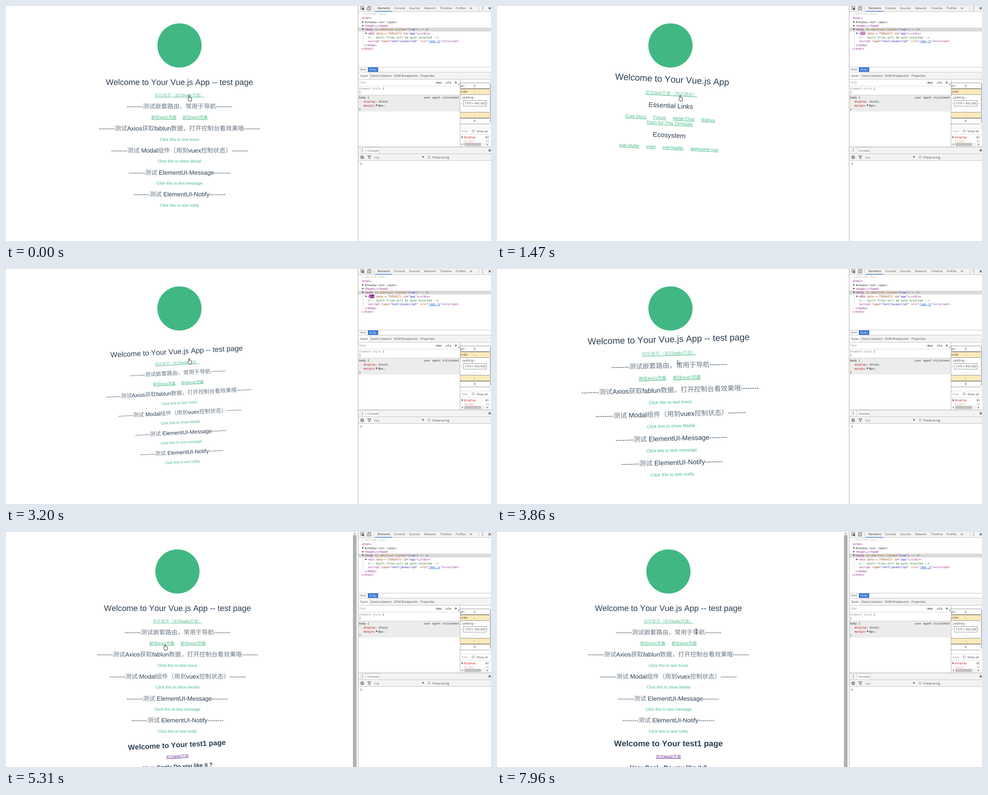
Write an HTML page that moves like this. It is 1075 by 521 pixels and loops after 8000 ms.

```html
<!DOCTYPE html>
<html lang="en">
<head>
<meta charset="utf-8">
<title>Route transitions</title>
<style>
html, body { margin: 0; width: 100%; height: 100%; overflow: hidden; background: #fff; }
svg { display: block; width: 1075px; height: 521px; }
text { white-space: pre; text-rendering: geometricPrecision; font-kerning: none; }
.page text { font-family: "Liberation Sans", Arial, "Noto Sans CJK SC", "Noto Sans CJK", sans-serif; text-anchor: middle; fill: #2c3e50; }
.page .link { fill: #42b983; }
.page .visited { fill: #551a8b; }
.page .u { text-decoration: underline; }
.cjk { fill-opacity: .7; }
.ui { font: 6.5px "Open Sans", "Noto Sans", sans-serif; fill: #444; }
.mono { font: 6.21px "DejaVu Sans Mono", "Noto Sans Mono", monospace; fill: #222; }
.bold { font-weight: bold; }
</style>
</head>
<body>
<svg id="stage" viewBox="0 0 1075 521"></svg>
<script>
const LOOP = 8000, SWAP_A = 650, SWAP_B = 2930, NEST = 5310;
const CX = 384.5, SHIFT = -4.5;
const stage = document.getElementById('stage');

function el(tag, attrs, parent = stage, text) {
  const node = document.createElementNS('http://www.w3.org/2000/svg', tag);
  for (const k in attrs) node.setAttribute(k, attrs[k]);
  if (text !== undefined) node.textContent = text;
  parent.appendChild(node);
  return node;
}
const group = parent => el('g', {}, parent);
const show = (node, on) => node.setAttribute('display', on ? 'inline' : 'none');

// ---- left page ----
const page = el('g', { class: 'page' });
el('circle', { cx: CX, cy: 87.5, r: 49, fill: '#41b883' }, page);

// Writes text, giving Chinese runs a lighter stroke.
function runs(node, str) {
  for (const part of str.match(/[\u3000-\uffff]+|[^\u3000-\uffff]+/g))
    el('tspan', /[\u3000-\uffff]/.test(part) ? { class: 'cjk' } : {}, node, part);
}
function line(parent, mid, size, str, cls = '') {
  runs(el('text', { x: CX, y: mid + size * .355, 'font-size': size, class: cls }, parent), str);
}
const h1 = (p, y, s, cls) => line(p, y, 18, s, cls);
const h2 = (p, y, s, cls) => line(p, y, 13.5, s, cls);
const link = (p, y, s, cls = 'link u') => line(p, y, 9, s, cls);
function links(parent, mid, list) {
  const row = el('text', { x: CX, y: mid + 3.2, 'font-size': 9, class: 'link' }, parent);
  list.forEach((s, i) => el('tspan', i ? { class: 'u', dx: 13.8 } : { class: 'u' }, row, s));
}
const rule = '-'.repeat(8);
const ruled = s => rule + s + rule;

const test = group(page);
h1(test, 169, 'Welcome to Your Vue.js App -- test page');
link(test, 197.5, '前往首页（返回hello页面）');
h2(test, 222, ruled('测试嵌套路由，常用于导航'));
links(test, 247, ['前往test1页面', '前往test2页面']);
h2(test, 271.5, ruled('测试Axios获取fablun数据，打开控制台看效果哦'));
link(test, 296, 'Click this to test Axios', 'link');
h2(test, 320, ruled('测试 Modal组件（用到vuex控制状态）'));
link(test, 344, 'Click this to show Modal', 'link');
h2(test, 369, ruled('测试 ElementUI-Message'));
link(test, 393, 'Click this to test message', 'link');
h2(test, 417.7, ruled('测试 ElementUI-Notify'));
link(test, 441.7, 'Click this to test notify', 'link');

const hello = group(page);
h1(hello, 169, 'Welcome to Your Vue.js App');
link(hello, 197.5, '前往test页面（测试路由）');
h2(hello, 222, 'Essential Links');
links(hello, 247, ['Core Docs', 'Forum', 'Mirlet Chat', 'Bolriva']);
links(hello, 257.3, ['Docs for This Template']);
h2(hello, 281.6, 'Ecosystem');
links(hello, 306, ['vue-router', 'vuex', 'vue-loader', 'awesome-vue']);

const nested = group(page);
h1(nested, 469, 'Welcome to Your test1 page', 'bold');
link(nested, 497.5, '前往test2页面', 'visited u');
h2(nested, 522, 'Very Cool~ Do you like it ?', 'bold');

const bar = group(stage);
rect(769, 0, 8, 521, '#f1f1f1', bar);
rect(769, 7, 8, 514, '#b0b0b0', bar);
shape('M771 4.5l2-2.5 2 2.5z', '#777', bar);

// ---- developer panel ----
function rect(x, y, width, height, fill, parent = stage, extra) {
  return el('rect', { x, y, width, height, fill, ...extra }, parent);
}
function shape(d, fill, parent = stage) { return el('path', { d, fill }, parent); }
function stroke(d, color, width = .8, dash = 'none') {
  return el('path', { d, fill: 'none', stroke: color, 'stroke-width': width, 'stroke-dasharray': dash });
}
const hline = (y, x = 780, end = 1075, color = '#c4c4c4') => stroke(`M${x} ${y + .5}H${end}`, color, 1);
const ui = (x, mid, s, fill = '#444') =>
  el('text', { x, y: mid + 2.3, class: 'ui', style: `fill:${fill}` }, stage, s);
// Pieces alternate text and colour.
function code(x, mid, ...pieces) {
  const node = el('text', { x, y: mid + 2.2, class: 'mono' });
  for (let i = 0; i < pieces.length; i += 2)
    el('tspan', { style: `fill:${pieces[i + 1]}` }, node, pieces[i]);
  return node;
}
const right = (x, y) => shape(`M${x} ${y - 2.3}l4 2.3-4 2.3z`, '#555');
const down = (x, y) => shape(`M${x} ${y - 2}h4.6l-2.3 4z`, '#555');
const cross = (x, y) => stroke(`M${x - 2.3} ${y - 2.3}l4.6 4.6m0-4.6l-4.6 4.6`, '#333', 1.1);
const dots = (x, y) => [-3, 0, 3].forEach(d => el('circle', { cx: x, cy: y + d, r: .8, fill: '#444' }));
const check = (x, y) => rect(x, y, 5, 5, '#e4e4e4', stage, { stroke: '#999', 'stroke-width': .7, rx: .8 });

const GRAY = '#888', TAG = '#881280', NAME = '#994500', VALUE = '#1a1aa6', RED = '#c80000', BAR = '#f3f3f3';

rect(780, 0, 295, 521, '#fff');

rect(780, 0, 295, 12, BAR);
hline(12);
stroke('M791 7.5h-4.5v-6h6.5v3', '#555', .9);
shape('M789 3.5l5.5 2.3-2.3.8 1.8 2-1 .8-1.7-2-1.2 2z', '#333');
stroke('M802.5 2.5v-1.7h6v8h-2.5M801 3.5h4v5.5h-4z', '#555', 1);
stroke('M815.5 1V10', '#ccc', 1);
[[823.5, 'Elements'], [860, 'Console'], [893.5, 'Sources'], [926.5, 'Network'], [962, 'Timeline'], [996.5, 'Profiles']]
  .forEach(([x, s], i) => ui(x, 5, s, i ? '#555' : '#222'));
rect(818, 11, 38, 1.4, '#4a84e0');
stroke('M1028 3l2 2-2 2m2.8-4l2 2-2 2', '#444', .9);
stroke('M1048.5 1V10', '#ccc', 1);
dots(1056.5, 5);
cross(1072, 5);

rect(781, 48, 294, 8.4, '#dadada');
code(788, 18, '<!DOCTYPE html>', '#b8b8b8');
code(788, 27, '<html>', TAG);
right(789.5, 35.3);
code(795, 35.5, '#shadow-root (open)', '#333');
right(789.5, 43.7);
code(795, 43.8, '<head>', TAG, '…', '#333', '</head>', TAG);
down(788.7, 52);
code(795, 52.2, '<body ', TAG, 'cz-shortcut-listen', NAME, '="', TAG, 'true', VALUE, '">', TAG, ' == $0', GRAY);
right(796.5, 60.5);
const flash = rect(805.3, 57, 11, 7.4, TAG, stage, { rx: 1 });
const divLine = code(802, 60.8, '<', TAG, 'div', TAG, ' data-v-7505e571 id', NAME, '="', TAG, 'app', VALUE, '">', TAG, '…', '#333', '</div>', TAG);
const divName = divLine.children[1];
code(802, 69.3, '<!-- built files will be auto injected -->', '#236e25');
code(802, 77.9, '<script ', TAG, 'type', NAME, '="', TAG, 'text/javascript', VALUE, '" ', TAG, 'src', NAME, '="', TAG,
  '/app.js', '#1155cc', '"></' + 'script>', TAG).children[7].setAttribute('text-decoration', 'underline');
code(795, 86.4, '</body>', TAG);
code(788, 95, '</html>', TAG);
stroke('M791.5 57V90', '#ccc', .7);

hline(135);
ui(784, 141, 'html');
rect(802, 136, 23, 10, '#3879d9');
ui(805.5, 141, 'body', '#fff').setAttribute('font-weight', 'bold');
hline(146);
rect(780, 147, 295, 15, BAR);
rect(781, 147, 25, 15, '#fff');
stroke('M806.5 147V162', '#c4c4c4', 1);
hline(162);
[[785, 'Styles'], [809, 'Event Listeners'], [859.5, 'DOM Breakpoints'], [918.5, 'Properties']]
  .forEach(([x, s]) => ui(x, 155, s));

ui(783, 169.5, 'Filter', '#999');
for (const [x, s] of [[951, ':hov'], [972, '.cls']])
  code(x, 169.5, s, '#444').classList.add('bold');
stroke('M994 169.5h6m-3-3v6', '#444', .9);
shape('M1004.5 171.5v3h-3z', '#444');
hline(177, 781, 1006, '#ddd');
code(782.5, 182.5, 'element.style', GRAY, ' {', '#222');
code(782.5, 191.2, '}', '#222');
rect(781, 198, 225, 36, '#ececec');
hline(197, 781, 1006, '#ccc');
code(782.5, 203.2, 'body {', '#222');
code(926, 203.2, 'user agent stylesheet', '#333');
code(792.5, 212, 'display', RED, ': block;', '#222');
code(792.5, 220.3, 'margin', RED, ':', '#222');
right(820, 220);
code(825, 220.3, '8px;', '#222');
code(782.5, 228.5, '}', '#222');
stroke('M1006.5 162V312', '#b4b4b4', 1);

// Box model
rect(1007, 184, 65, 12, '#fdeabb');
rect(1007, 236, 65, 12, '#fdeabb');
for (const y of [170.5, 196.5, 235.5, 261.5]) stroke(`M1007 ${y}H1072`, '#333', .9, '2 1.4');
for (const y of [183.5, 248.5]) stroke(`M1007 ${y}H1072`, '#333', 1);
ui(1007, 177, 'gin');
ui(1007, 190, 'order');
ui(1011, 203, 'padding –');
for (const [x, y, s] of [[1037, 177, '8'], [1037, 190, '–'], [1008.5, 216, '–'], [1066.5, 216, '–'],
  [1037, 229, '–'], [1037, 242, '–'], [1037, 255, '8']]) ui(x, y, s);
rect(1014, 209.5, 50.5, 12.5, '#fff', stage, { stroke: '#777', 'stroke-width': .8 });
ui(1016.5, 216, '1370 × 492.500');
rect(1072, 163, 3, 107, BAR);
rect(1072.6, 171, 2.4, 87, '#c1c1c1');
hline(270, 1007, 1075, '#ddd');
ui(1009.5, 277.5, 'Filter', '#999');
check(1033, 274.5);
ui(1043, 277.5, 'Show all');
hline(284, 1007, 1075, '#ddd');
right(1009.5, 290.7);
code(1015, 291, 'display', RED);
code(1063, 291, 'bl', '#222');
code(1015, 299.7, 'height', '#e8a0a0');
code(1063, 299.7, '49', '#aaa');
rect(1007, 303, 65, 8, BAR);
rect(1016, 303.5, 37, 7, '#c1c1c1');
shape('M1012.5 305v4l-2.5-2z', '#666');
shape('M1066 305v4l2.5-2z', '#666');

// Console drawer
rect(780, 312, 295, 15, BAR);
hline(312, 780, 1075, '#a8a8a8');
dots(789.5, 320);
rect(797.5, 313.5, 30, 14, '#fff', stage, { stroke: '#c4c4c4', 'stroke-width': .8 });
ui(801, 320.5, 'Console');
cross(1072, 320);
hline(327);
rect(780, 328, 295, 14, BAR);
el('circle', { cx: 789.5, cy: 335.3, r: 3.1, fill: 'none', stroke: '#444', 'stroke-width': 1.1 });
stroke('M787.4 333.2l4.2 4.2', '#444', 1.1);
stroke('M801.5 332.2h7.5l-2.8 3.3v3.2l-1.8-1v-2.2z', '#444', 1);
code(816, 335.5, 'top', '#777');
down(922, 335);
check(935.5, 332.5);
ui(945, 335.5, 'Preserve log');
hline(342);
stroke('M786 347.5l2.3 2.3-2.3 2.3', '#3b7de0', 1.1);
stroke('M780.5 0V521', '#a8a8a8', 1);

// ---- pointer ----
const pointer = group(stage);
const hand = el('path', { d: 'M-1 6.8V1q0-1 1-1t1 1V4.6l3.2.7q1.2.3 1.2 1.5v2.6l-1 3.6h-5L-3 8.5q-.4-1 .5-1.4z',
  fill: '#fff', stroke: '#111', 'stroke-width': .9 }, pointer);
const arrow = el('path', { d: 'M0 0V8.6l1.9-1.7 1.5 3.2 1.3-.6-1.4-3.1H5.8z',
  fill: '#fff', stroke: '#222', 'stroke-width': .8 }, pointer);
const beam = el('path', { d: 'M-2-5.5h1.4l.6.7.6-.7H2M0-4.8V4.8M-2 5.5h1.4l.6-.7.6.7H2',
  fill: 'none', stroke: '#222', 'stroke-width': .9 }, pointer);

const track = [
  [0, 406, 198], [3650, 406, 198], [3860, 400, 202], [4450, 352.5, 249], [5550, 352.5, 249],
  [6200, 302.5, 223.5], [6440, 302.5, 223.5], [6960, 454, 222], [7440, 302.5, 223.5],
  [7620, 302.5, 223.5], [7840, 454, 221], [7960, 442, 220.5], [LOOP, 442, 220.5]
];
function place(t) {
  const i = track.findIndex(k => k[0] > t);
  const [t0, x0, y0] = track[i - 1], [t1, x1, y1] = track[i];
  const f = (t - t0) / (t1 - t0);
  return [x0 + (x1 - x0) * f, y0 + (y1 - y0) * f];
}

// ---- motion ----
// The CSS "ease" curve: cubic-bezier(.25, .1, .25, 1)
function ease(x) {
  const bez = (a, b, u) => 3 * a * u * (1 - u) ** 2 + 3 * b * u * u * (1 - u) + u ** 3;
  let lo = 0, hi = 1;
  for (let i = 0; i < 20; i++) {
    const mid = (lo + hi) / 2;
    if (bez(.25, .25, mid) < x) lo = mid; else hi = mid;
  }
  return bez(.1, 1, lo);
}
const TURN = [0, -3, -3, 3, -3, 3, -3, 3, -3, 3, 0];
const SIZE = TURN.map((a, i) => !a ? 1 : i < 3 ? .9 : 1.1);

// Shrink, then wobble at a larger size, about (CX, cy).
function tada(node, cy, elapsed, span) {
  const p = Math.min(1, Math.max(0, elapsed / span)) * 10;
  const i = Math.min(9, Math.floor(p)), e = ease(p - i);
  const mix = list => list[i] + (list[i + 1] - list[i]) * e;
  node.setAttribute('transform',
    `translate(${CX} ${cy}) rotate(${mix(TURN)}) scale(${mix(SIZE)}) translate(${-CX} ${-cy})`);
}
function glow(t) {
  if (t < 150) return .15;
  const end = t >= SWAP_B ? 3930 : t >= SWAP_A ? 1760 : 0;
  return Math.min(1, Math.max(0, (end - t) / 600));
}

function draw(t) {
  const onHello = t >= SWAP_A && t < SWAP_B, open = t >= NEST;
  show(hello, onHello);
  show(test, !onHello);
  show(nested, open);
  show(bar, open);
  page.setAttribute('transform', `translate(${open ? SHIFT : 0} 0)`);
  tada(hello, 235, t - 745, 1500);
  tada(test, 304, t < SWAP_B ? 0 : t - 3041, 1500);
  tada(nested, 496, t - 5190, 1000);

  const a = glow(t);
  flash.setAttribute('fill-opacity', a);
  divName.style.fill = `rgb(${136 + 119 * a},${18 + 237 * a},${128 + 127 * a})`;

  const [x, y] = place(t);
  pointer.setAttribute('transform', `translate(${x} ${y})`);
  const isArrow = t >= 3750 && t < 4400, isBeam = t >= 5750;
  show(arrow, isArrow);
  show(beam, isBeam);
  show(hand, !isArrow && !isBeam);
}

const start = performance.now();
function frame() {
  draw((performance.now() - start) % LOOP);
  requestAnimationFrame(frame);
}
draw(0);
requestAnimationFrame(frame);
</script>
</body>
</html>
```
